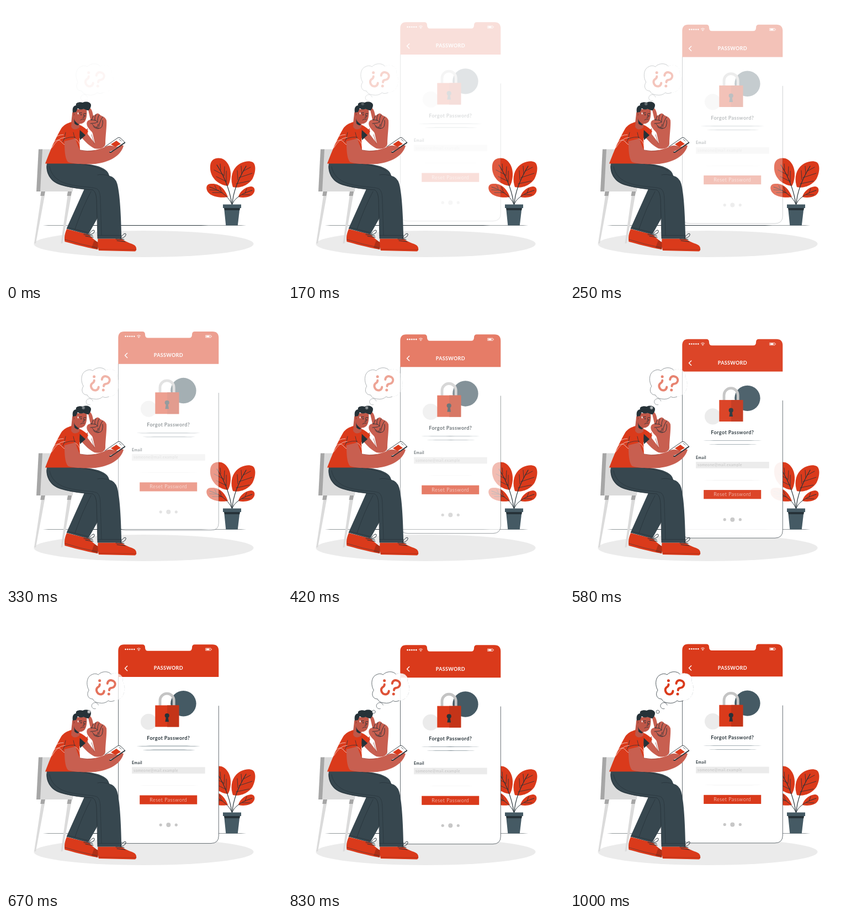
Animation, 500 px wide and 500 px high, one loop 1040 ms. Source, as an HTML page with a canvas:

```html
<!DOCTYPE html>
<html lang="en">
<head>
<meta charset="utf-8">
<title>Forgot password</title>
<style>
html, body { margin: 0; width: 100%; height: 100%; overflow: hidden; background: #fff; }
canvas { display: block; width: 500px; height: 500px; }
</style>
</head>
<body>
<canvas id="stage"></canvas>
<script>
const SIZE = 500, LOOP = 1040, STEP = 1000 / 24;
const RED = '#da3a1b', DARK = '#263238', SLATE = '#37474f', STEEL = '#455a64';
const PALE = '#ebebeb', GREY = '#c7c7c7', SKIN = '#c85f50', FACE = '#bf5748';
const FONT = 'Lato, "Open Sans", sans-serif';
const dpr = window.devicePixelRatio || 1;

const stage = document.getElementById('stage');
const layerCanvas = document.createElement('canvas');
for (const c of [stage, layerCanvas]) c.width = c.height = Math.round(SIZE * dpr);
const out = stage.getContext('2d');
const buf = layerCanvas.getContext('2d');
let g = out;

function fill(d, color) {
  g.fillStyle = color;
  g.fill(new Path2D(d));
}

function line(d, color = DARK, width = 0.8) {
  g.strokeStyle = color;
  g.lineWidth = width;
  g.lineCap = g.lineJoin = 'round';
  g.stroke(new Path2D(d));
}

function oval(x, y, rx, color, ry = rx) {
  g.beginPath();
  g.ellipse(x, y, rx, ry, 0, 0, Math.PI * 2);
  g.fillStyle = color;
  g.fill();
}

function rect(x, y, w, h, color) {
  g.fillStyle = color;
  g.fillRect(x, y, w, h);
}

// Horizontal rule that thins out towards both ends
function taper(x1, x2, y, w, color) {
  const in1 = x1 + (x2 - x1) * 0.2, in2 = x2 - (x2 - x1) * 0.2, h = w * 0.67;
  fill(`M${x1} ${y}C${in1} ${y - h} ${in2} ${y - h} ${x2} ${y}C${in2} ${y + h} ${in1} ${y + h} ${x1} ${y}Z`, color);
}

function text(str, x, y, font, color, spacing, align = 'left') {
  g.font = font + ' ' + FONT;
  g.fillStyle = color;
  g.textAlign = align;
  g.letterSpacing = spacing + 'px';
  g.fillText(str, x, y);
}

function drawRoom() {
  taper(50, 452, 397.5, 1, DARK);
  oval(249.5, 431, 199, PALE, 24);
  drawPlant();
}

function drawPlant() {
  fill('M402 326C384 324 368 310 370 289C371 277 381 274 390 276C404 281 408 297 407 308C406 318 404 323 402 326Z', RED);
  fill('M411 328C407 316 407 302 417 291C426 282 439 279 447 283C454 288 452 303 446 314C439 324 425 331 411 328Z', RED);
  fill('M402 346C392 348 372 347 365 336C361 328 364 322 372 322C387 321 397 332 402 346Z', RED);
  fill('M421 346C423 337 433 327 445 327C451 328 452 335 448 340C443 347 430 348 421 346Z', RED);
  line('M409 359C407 343 400 315 382 288M410 359C411 338 420 315 435 290', DARK, 1.2);
  line('M409 359C404 346 389 334 369 328M410 359C413 350 425 340 446 334', DARK, 1);
  line('M399 318L399 299M399 318L381 309M395 308L396 291M394 306L377 297M389 297L388 286');
  line('M417 322L441 317M420 315L419 298M422 311L446 303M427 304L426 290M430 299L443 292');
  line('M392 338L374 338M385 334L369 333M390 336L387 328M381 331L378 325M428 342L442 342M433 339L436 331');
  rect(393, 359.5, 33, 6.5, STEEL);
  fill('M395.5 370H423L419.8 397.5H398.3Z', STEEL);
  fill('M395 366H424L423.4 370H395.6Z', DARK);
}

function drawPhone() {
  const frame = 'M203.5 113V401Q203.5 414.9 217 414.9H371Q385.3 414.9 385.3 401V';
  fill(frame + '66H203.5Z', '#fff');
  line(frame + '166', DARK, 0.7);
  fill('M203.3 113.3V66Q203.3 54.5 214 54.5H247Q252 54.5 252 60Q252 66 257 66H332Q337 66 337 60Q337 54.5 342 54.5H374Q385.3 54.5 385.3 66V113.3Z', RED);

  for (let i = 0; i < 5; i++) oval(216.6 + i * 3.9, 63.3, 1.3, '#fff');
  line('M237.5 62.2Q240.5 59.8 243.5 62.2M238.8 64Q240.5 62.6 242.2 64', '#fff', 0.9);
  oval(240.5, 65.4, 0.8, '#fff');
  line('M362 61.3H371V65.5H362ZM372.4 62.8V64', '#fff', 0.7);
  rect(362.8, 62, 5.8, 2.8, '#fff');
  line('M219.7 93.7L215.5 97.8L219.7 102', '#fff', 1.4);
  text('PASSWORD', 294.3, 100.7, 'bold 9px', '#fff', 0.35, 'center');

  oval(321.4, 161.6, 23.2, STEEL);
  oval(258.5, 194.6, 14.6, PALE);
  line('M279 166V156A12.6 12.6 0 0 1 304.2 156V166', '#c4c4c4', 4.8);
  rect(270.3, 164.8, 43, 39, RED);
  rect(292, 164.8, 21.3, 39, '#c43418');
  oval(291.7, 183.4, 4.1, DARK);
  fill('M290 185H293.4L295 194.7H288.4Z', DARK);

  text('Forgot Password?', 294.3, 227, 'bold 9px', DARK, 0.42, 'center');
  taper(236, 352, 238.5, 0.7, STEEL);
  taper(247, 343, 245.5, 0.7, STEEL);
  text('Email', 228, 271.3, 'bold 7px', DARK, 0.4);
  rect(228, 276.7, 132.7, 11.8, PALE);
  text('someone@mail.example', 231, 285, '7px', '#c2c2c2', 0.35);
  taper(238, 352, 310, 0.4, '#e4e4e4');
  rect(242.2, 327.8, 104, 16.2, RED);
  text('Reset Password', 294.2, 339, '300 9px', '#fff', 0.5, 'center');
  oval(280.2, 381.4, 2.6, GREY);
  oval(294.3, 381.4, 4, GREY);
  oval(308.3, 381.4, 2.6, GREY);
}

function drawChair() {
  fill('M65 259.5H125L121 336H61Z', '#dbdbdb');
  fill('M59 259.5H66L62 336H55Z', '#a6a6a6');
  fill('M64 344H70L54 430H51ZM111.5 344H118L102.5 430H99.5Z', '#dbdbdb');
  fill('M63.5 336H71L69.5 344H62.3ZM112 336H119.3L117.7 344H110.5Z', '#a6a6a6');
}

function drawLegs() {
  fill('M110 404L150 414C158 422 164 427 168 429L166 441C142 437 122 431 106.5 427C105 419 107 410 110 404Z', RED);
  fill('M160 424L168 429L166 441L155 438Z', '#b02f16');
  line('M107 423Q135 432 166 438', DARK, 0.5);
  fill('M166.5 421.5H209.5C217 428 228 430 233 433.5C237.5 437 237 444.6 233 444.6L168 443Q165.5 432 166.5 421.5Z', RED);
  line('M167 440.5L236 441.5', '#8f2a17', 0.5);

  fill('M143 329L109.5 403.5L149 414L167 382L170 325Z', SLATE);
  line('M112 401L149 410.5M154 336Q138 366 125 404', DARK, 0.7);
  fill('M74 285C71 302 80 317 95 323C112 329.5 142 332.5 158 333Q164 336 164.5 350L166 421.5H209.3C208.5 392 207.5 345 201.5 322Q198 310 187 307.5C185 294 165 287 134 285Z', SLATE);
  line('M74 290C74 306 84 318 98 323C118 330 142 332.5 157 333Q163 336 164 350L166 421', DARK, 0.8);
  line('M79 291C82 309 97 319 114 323C138 329 158 327 166 332Q171 337 171 352L173 415', DARK, 0.6);
  line('M187 307.5Q174 304 166 306M166 415.5H209M134 286Q165 290 178 299', DARK, 0.7);
  line('M141 414L157 416M144 417L158 419M150 414C156 404 163 404 159 411Q156 414 151 414', DARK, 1);
  line('M199 422L214 423M201 425L216 427M207 421C213 410 220 410 216 417Q213 421 207 421', DARK, 1);
}

function drawBody() {
  // raised arm
  fill('M148 221L136 237C143 246 152 254 160 258C168 260 180 258 180 249C180 236 183 216 182 207C179 199 170 199 169 196Q166 193 163 196L158 199C157 191 154 184 151 185Q148 187 150 193L153 206C147 207 145 211 147 217C150 224 156 227 157 231L161 249L148 232Z', SKIN);
  fill('M130 214C138 217 145 222 149 227L142 236L132 240Z', RED);
  fill('M132 223L144 234L134 243Z', DARK);

  // neck and shirt
  fill('M120 195L117 221Q125 230 133 223L133 209Z', FACE);
  fill('M119 210C111 212 104 216 100 222C88 243 80 262 71 285.5H134L134 262L133 239L134 219Q124 228 118 219Z', RED);
  line('M122 229L125 242M105 241Q117 236 126 238M103 246L106 239L108 229', DARK, 0.7);
  line('M92 236Q98 233 104 233M83 254C87 242 96 240 101 247Q104 251 108 252M107 238Q93 239 83 257M124 240Q133 244 134 254', '#f6d9d2', 0.8);

  // forearm holding the handset
  fill('M106 245C106 262 107 278 113 283C126 287 146 287 162 286C187 283 208 272 213 253Q206 249 198 255L178 256C164 262 146 264 134 261Q129 252 126 240Z', SKIN);
  line('M155 233L160 250M134 261Q148 264 160 262', '#8e3b32', 0.7);
  fill('M179 255L203 238.5Q205 237.5 207 239L215 246.5L190 265L187 263Z', '#fff');
  line('M179 255L203 238.5Q205 237.5 207 239L215 246.5', DARK, 0.9);
  line('M188 264.7L190 265L215.3 247.5', DARK, 1.9);
  fill('M190 250.5L200 244L208 250L198 255.5Z', RED);
  fill('M178 256C185 252 191 252 198 255L203 254.5C199 259 192 263 187 263.5Z', SKIN);
  line('M205 241.5L209 244.7', DARK, 0.7);

  // knuckles
  line('M153 206C158 207 164 206 165 210C164 213 157 212 153 213M158 199L155 207M163 196Q160 201 161 207M169 197Q165 203 166 211M175 201Q170 208 168 219', DARK, 0.9);
  line('M156 214L161 219Q166 222 167 214M164 220Q171 224 174 218Q176 212 175 207M158 218Q162 223 168 222', DARK, 0.9);
}

function drawHead() {
  fill('M124 187C121 195 121 206 126 211Q134 216 141 211C146 207 147 197 146 187Z', FACE);
  oval(123.3, 195.5, 3.4, FACE, 4.7);
  line('M122 194Q125 195 123 198', '#7d3028', 0.7);
  fill('M121 193C120 186 121 181 127 180C125 175 134 173 139 175C145 172 153 174 154 179C154 184 152 186 150 189C146 190 143 186 139 187C135 188 132 187 130 185L127 192Z', DARK);
  fill('M123 203C124 210 129 211 132 215Q129 218 124 213Z', DARK);
  line('M133 194L137 193.5M141 195L145 195', DARK, 1.1);
  oval(136, 197, 1.1, DARK);
  oval(142.7, 199, 1.1, DARK);
  line('M140 196L141.5 202L139 202M135 206.5Q138 203.8 142 205', DARK, 0.8);
  fill('M130.3 192Q128.7 196 130.8 196.5Q132.8 196 130.3 192Z', '#fff');
}

function drawMan() {
  drawChair();
  drawLegs();
  drawBody();
  drawHead();
}

function drawBubble() {
  const left = 'M205 157Q198 160 194 157Q188 163 177 161Q168 160 166 154C157 154 154 145 159 138C154 130 154 116 162 111Q170 106 176 110C182 103 195 103 199 109';
  const right = 'Q208 105 216 110Q222 115 220 122Q226 132 222 144Q218 156 205 157';
  fill(left + right + 'Z', '#fff');
  line(left, DARK, 0.8);
  g.setLineDash([5, 3, 1, 4]);
  line('M199 109' + right, '#cfd4d6', 0.6);
  g.setLineDash([]);
  oval(170, 166, 6, '#fff', 5.8);
  line('M171 171.6C166 173 162.5 168 164.5 164C167 159 175 159.5 176 165', DARK, 0.7);
  oval(159, 177.2, 3.1, '#fff');
  line('M162 177.2A3 3 0 1 1 156 177.2A3 3 0 0 1 162 177.2', DARK, 0.7);
  line('M192.5 126C193 121 197 119.7 200 120.2C204.5 121 207 124 206.4 128C205.5 133 202 133.7 199 134Q196 134.5 195.7 138', RED, 4);
  oval(195, 145, 2.5, RED);
  line('M178.5 127.5C178.5 131.5 176.5 131.5 174.5 133.3C171.6 136 172.3 141 175.5 143.8C180 147 186 145.3 186.5 139.5', RED, 4);
  oval(178.4, 120.8, 2.5, RED);
}

// Composites a whole group at one opacity
function layer(draw, alpha, dx, dy) {
  if (alpha < 0.01) return;
  g = buf;
  g.setTransform(1, 0, 0, 1, 0, 0);
  g.clearRect(0, 0, layerCanvas.width, layerCanvas.height);
  g.setTransform(dpr, 0, 0, dpr, dx * dpr, dy * dpr);
  draw();
  g = out;
  g.globalAlpha = Math.min(1, alpha);
  g.drawImage(layerCanvas, 0, 0, SIZE, SIZE);
  g.globalAlpha = 1;
}

const bezier = (s, a, b) => 3 * (1 - s) * (1 - s) * s * a + 3 * (1 - s) * s * s * b + s * s * s;

// Cubic ease with a small overshoot
function overshoot(p) {
  let lo = 0, hi = 1;
  for (let i = 0; i < 24; i++) {
    const mid = (lo + hi) / 2;
    if (bezier(mid, 0.36, 0.5) < p) lo = mid; else hi = mid;
  }
  return bezier(lo, -0.01, 1.38);
}

function render(ms) {
  const step = Math.min(24, Math.floor((ms % LOOP + 5) / STEP));
  const p = Math.min(1, (step + 1) * STEP / 1000);
  const drop = overshoot(p);
  g = out;
  g.setTransform(dpr, 0, 0, dpr, 0, 0);
  rect(0, 0, SIZE, SIZE, '#fff');
  drawRoom();
  layer(drawPhone, drop, 0, 30 * (drop - 1));
  drawMan();
  layer(drawBubble, p, 30 * (p - 1), 0);
}

const start = performance.now();
function tick() {
  render(performance.now() - start);
  requestAnimationFrame(tick);
}
tick();
</script>
</body>
</html>
```
